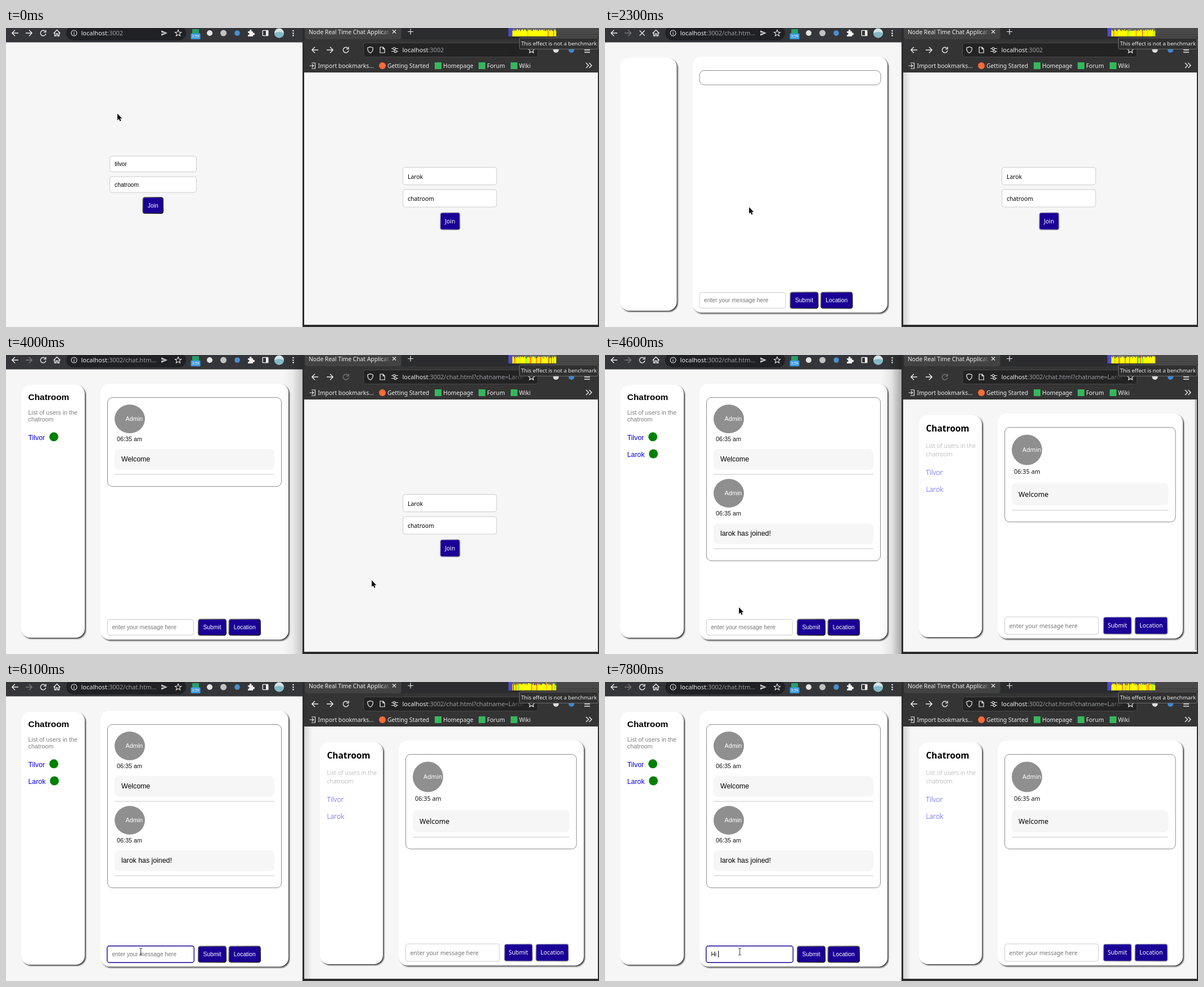
Recreate the animation shown at these times as an HTML page with a canvas. Size 1054x531 px, loop 8000 ms.

```html
<!DOCTYPE html>
<html lang="en">
<head>
<meta charset="utf-8">
<title>Chat demo</title>
<style>
html, body { margin: 0; width: 100%; height: 100%; overflow: hidden; background: #f6f6f6; }
svg, canvas { position: absolute; left: 0; top: 0; display: block; }
canvas { left: 893px; }
text { white-space: pre; }
.arial { font-family: "Liberation Sans", Arial, sans-serif; }
.noto { font-family: "Noto Sans", sans-serif; }
.thin { font-family: "Open Sans", "Noto Sans", sans-serif; font-weight: 300; }
.s10 { font-size: 10.3px; }
.s11 { font-size: 10.8px; }
.s12 { font-size: 12.35px; }
.s15 { font-size: 15.43px; font-weight: 700; }
.url { font-size: 11px; fill: #e8eaed; }
.dim { fill: #9a9da1; }
.hint { fill: #757575; }
.white { fill: #fff; }
.link { fill: #0a00e0; }
.mid { text-anchor: middle; }
.line { fill: none; stroke: #ececec; stroke-width: 1.4; }
.off { stroke: #77797c; }
.panel { fill: #fff; filter: drop-shadow(2.5px 2.5px .8px #444); }
#pointer { animation: move 8s step-end infinite; }
#shade { animation: shade 8s step-end infinite; }
@keyframes shade {
  0% { opacity: 0 } 47.5% { opacity: .3 } 50% { opacity: .65 }
  52.5% { opacity: 1 } 68.75% { opacity: 0 }
}
@keyframes move {
  0% { transform: translate(198px, 152px) }
  5% { transform: translate(204px, 174px) }
  7.5% { transform: translate(214px, 205px) }
  8.75% { transform: translate(226px, 240px) }
  10% { transform: translate(238px, 275px) }
  11.25% { transform: translate(246px, 300px) }
  12.5% { transform: translate(250px, 317px) }
  13.75% { transform: translate(252px, 322px) }
  20% { transform: translate(256px, 318px) }
  37.5% { transform: translate(790px, 308px) }
  40% { transform: translate(802px, 322px) }
  41.25% { transform: translate(800px, 333px) }
  42.5% { transform: translate(799px, 335px) }
  45% { transform: translate(799px, 342px) }
  47.5% { transform: translate(770px, 362px) }
  50% { transform: translate(650px, 400px) }
  52.5% { transform: translate(500px, 430px) }
  55% { transform: translate(300px, 452px) }
  57.5% { transform: translate(238px, 448px) }
  61.25% { transform: translate(239.5px, 468px) }
  63.75% { transform: translate(239.5px, 472px) }
}
</style>
</head>
<body>
<svg id="stage" width="1054" height="531" viewBox="0 0 1054 531"></svg>
<canvas id="load" width="85" height="15"></canvas>
<script>
const LOOP = 8000;
const userA = 'Tilvor', userB = 'Larok';
let css = '', count = 0;

const rect = (x, y, w, h, r, attrs) =>
  `<rect x="${x}" y="${y}" width="${w}" height="${h}" rx="${r}" ${attrs}/>`;
const text = (x, y, cls, s) => `<text x="${x}" y="${y}" class="${cls}">${s}</text>`;
const path = (d, attrs = 'class="line"') => `<path d="${d}" ${attrs}/>`;
const dot = (x, y, r, fill) => `<circle cx="${x}" cy="${y}" r="${r}" fill="${fill}"/>`;
const at = (x, y, ...kids) => `<g transform="translate(${x} ${y})">${kids.join('')}</g>`;

// Shows the content only during the given spans of milliseconds.
function on(spans, ...kids) {
  const name = 'on' + count++;
  const marks = spans.map(([a, b]) => `${a / LOOP * 100}%{opacity:1}` +
    (b < LOOP ? `${b / LOOP * 100}%{opacity:0}` : ''));
  css += `@keyframes ${name}{0%{opacity:${spans[0][0] ? 0 : 1}}${marks.join('')}}`;
  return `<g style="animation:${name} 8s step-end infinite">${kids.join('')}</g>`;
}
const from = (t, ...kids) => on([[t, LOOP]], ...kids);
const until = (t, ...kids) => on([[0, t]], ...kids);

const back = 'M6 0H-5M0-5.2L-5.2 0 0 5.2', ahead = 'M-6 0H5M0-5.2L5.2 0 0 5.2';
const reload = 'M3.6-3.2A4.8 4.8 0 1 0 4.8 1M4.9-5.5V-1.6H1';
const star = 'M0-5.7L1.7-1.8 5.6-1.5 2.6 1.1 3.5 5 0 2.9-3.5 5-2.6 1.1-5.6-1.5-1.7-1.8z';

const input = (x, y, w, h) => rect(x + .5, y + .5, w, h, 4, 'fill="#fff" stroke="#ccc"');
const button = (x, y, w, h, fill, edge, font, label) =>
  rect(x + .75, y + .75, w - 1.5, h - 1.5, 3.5, `fill="${fill}" stroke="url(#${edge})" stroke-width="1.5"`) +
  text(x + w / 2, y + h / 2 + 3.7, `${font} s10 white mid`, label);

const NAVY = '#1a0096';

const defs = `<defs>
  <linearGradient id="dark" x2="1" y2="1"><stop stop-color="#777"/><stop offset=".5" stop-color="#444"/><stop offset="1" stop-color="#0c0c14"/></linearGradient>
  <linearGradient id="pale" x2="1" y2="1"><stop stop-color="#d4d4dc"/><stop offset="1" stop-color="#85858f"/></linearGradient>
  <linearGradient id="toTab"><stop stop-color="#424242" stop-opacity="0"/><stop offset=".5" stop-color="#424242"/></linearGradient>
  <linearGradient id="toField"><stop stop-color="#232323" stop-opacity="0"/><stop offset="1" stop-color="#232323"/></linearGradient>
  <linearGradient id="shadeL"><stop stop-opacity="0"/><stop offset=".5" stop-opacity=".07"/><stop offset="1" stop-opacity=".32"/></linearGradient>
  <linearGradient id="shadeR"><stop stop-opacity=".14"/><stop offset="1" stop-opacity="0"/></linearGradient>
</defs>`;

function leftBar() {
  const host = 'localhost<tspan class="dim">:3002';
  return rect(0, 0, 527, 25.5, 0, 'fill="#353639"') +
    rect(107, -4, 213, 26, 13, 'fill="#202124"') +
    at(16, 9, path(back)) +
    at(41, 9, until(1600, path(ahead)), from(1600, path(ahead, 'class="line off"'))) +
    at(66, 9, on([[0, 1400], [2500, LOOP]], path(reload)),
      on([[1400, 2500]], path('M-4.5-4.5L4.5 4.5M4.5-4.5L-4.5 4.5'))) +
    at(90.5, 9, path('M-6 .5L0-5.5 6 .5M-4-1V5H-1.3V1.2H1.3V5H4V-1')) +
    at(121, 9, path('M0-5A5 5 0 1 1-.01-5zM0-.6V3M0-2.8V-1.5', 'class="line" style="stroke-width:1.1"')) +
    until(1600, text(133.5, 13, 'noto url', host + '</tspan>')) +
    from(1600, text(133.5, 13, 'noto url', host + '/chat.htm…</tspan>')) +
    at(281, 9, path('M-5-4.8L6 0-5 4.8V1.2L1.5 0-5-1.2z', 'fill="#c4c6c8"')) +
    at(306, 9, path(star, 'class="line" style="stroke-width:1.1"')) +
    rect(331, 2, 12, 8, 1, 'fill="#25a068"') +
    rect(328.5, 9.5, 17, 10.5, 1.5, 'fill="#3d9be0"') +
    text(337, 17.3, 'noto white mid" font-size="6.8', '3:59') +
    dot(362, 9, 5, '#e4e4e4') + dot(386.5, 9, 5.5, '#c2c2c2') + dot(411, 9, 4.8, '#4a90d0') +
    at(435, 9, path('M-5-3H-2A2 2 0 1 1 1.3-3H4V0A2 2 0 1 1 4 3.3V6H-5V3A1.8 1.8 0 1 0-5-.3z', 'fill="#f2f2f2"')) +
    at(461, 9, rect(-4.8, -4.6, 9.6, 9.2, .5, 'class="line"'), rect(1, -4.6, 4, 9.2, 0, 'fill="#f2f2f2"')) +
    dot(485.5, 9, 8.5, '#d3e4e6') + path('M477 9Q485 5 494 9A8.5 8.5 0 0 1 477 9z', 'fill="#83b9c6"') +
    [5, 9.2, 13.4].map(y => dot(510.5, y, 1.3, '#eee')).join('');
}

function leftLogin() {
  const join = fill => button(242.5, 300, 37.5, 30, fill, 'dark', 'arial', 'Join');
  return input(184, 227, 154, 28) + input(184, 263.5, 154, 28) +
    text(193, 245.3, 'arial s10', userA.toLowerCase()) + text(193, 281.8, 'arial s10', 'chatroom') +
    join(NAVY) + on([[1000, 1600]], join('#00f'));
}

function leftFrame(dx) {
  return rect(27, 53, 113 + dx, 449, 16, 'class="panel"') +
    rect(168 + dx, 51, 334 - dx, 454.5, 16, 'class="panel"') +
    at(dx, 0, input(180, 469, 153, 28),
      button(341, 468.5, 51, 30, NAVY, 'dark', 'arial', 'Submit'),
      button(395.5, 468.5, 57.5, 30, NAVY, 'dark', 'arial', 'Location'));
}

const board = (x, y, w, h) => rect(x + .5, y + .5, w, h, 8.5, 'fill="#fff" stroke="#8c8c8c"');
const leftHint = x => text(x, 487, 'arial s10 hint', 'enter your message here');

const leftNote = (y, s) => at(193, y,
  '<ellipse cx="27" cy="25.5" rx="27" ry="25.5" fill="#8f8f8f"/>',
  text(19.5, 29.3, 'arial s11 white', 'Admin'), text(4, 65, 'arial s11" fill="#111', '06:35 am'),
  rect(0, 79, 284, 37, 8, 'fill="#f6f6f6"'), text(12, 101.3, 'arial s12', s),
  rect(0, 123.5, 284, 1, 0, 'fill="#c8c8c8"'));

const caret = (x, ...spans) => on(spans, rect(x, 477.5, 1, 11.5, 0, ''));

function leftChat() {
  return leftFrame(0) +
    until(4400, board(180, 75, 309, 158)) +
    from(4400, board(180, 75, 309, 290), leftNote(220, userB.toLowerCase() + ' has joined!'),
      text(39.5, 180.7, 'arial s12 link', userB), dot(86, 175.5, 8, '#008000')) +
    leftNote(88, 'Welcome') +
    text(39.5, 79.5, 'arial s15', 'Chatroom') +
    text(39.5, 105.7, 'arial s11" fill="#808080', 'List of users in the') +
    text(39.5, 118, 'arial s11" fill="#808080', 'chatroom') +
    text(39.5, 150.5, 'arial s12 link', userA) + dot(85, 145.3, 8, '#008000') +
    from(5500, rect(179.75, 468.75, 154.5, 29.5, 4, `fill="#fff" stroke="${NAVY}" stroke-width="1.4"`)) +
    until(7000, leftHint(188.4)) +
    from(7000, text(188.4, 487, 'arial s10', 'H')) + from(7300, text(195.8, 487, 'arial s10', 'i')) +
    caret(188, [5500, 6000], [6500, 7000]) + caret(195.6, [7000, 7300]) +
    caret(198, [7300, 7700]) + caret(201, [7700, LOOP]);
}

function rightBar() {
  const host = 'localhost<tspan class="dim">:3002';
  const mark = (x, label) => rect(x, 61, 12, 12, 0, 'fill="#35b85c"') + text(x + 15, 70.5, 'noto s10" fill="#eee', label);
  return rect(527, 0, 527, 531, 0, 'fill="#2b2c2d"') +
    rect(530, 20, 524, 59, 0, 'fill="#343434"') +
    rect(531, -6, 171.5, 26, 4, 'fill="#424242"') +
    text(538, 10.5, 'noto s10" fill="#eee', 'Node Real Time Chat Application') +
    rect(667, 0, 32, 18, 0, 'fill="url(#toTab)"') +
    at(690, 6.5, path('M-3-3L3 3M3-3L-3 3', 'class="line" style="stroke-width:1.1"')) +
    at(719, 6.5, path('M-5 0H5M0-5V5', 'class="line" style="stroke-width:1.2"')) +
    rect(635.5, 26.5, 310, 25, 4, 'fill="#232323" stroke="#484848"') +
    at(549, 39, path(back)) + at(576, 39, path(ahead)) +
    at(604, 39, on([[0, 3800], [5100, LOOP]], path(reload)), on([[3800, 5100]], path(reload, 'class="line off"'))) +
    at(647.5, 39, path('M0-5.5L4.8-3.8Q5 3 0 5.5-5 3-4.8-3.8z', 'class="line" style="stroke-width:1.2"')) +
    at(669, 39, path('M-4-5H1.2L4-2V5H-4zM1-5V-1.8H4', 'class="line" style="stroke-width:1.2"')) +
    at(691, 39, path('M-6-2.5H-3M1-2.5H6M-6 2.5H-1M3 2.5H6M-3-2.5A2 2 0 1 1 1-2.5 2 2 0 1 1-3-2.5M-1 2.5A2 2 0 1 1 3 2.5 2 2 0 1 1-1 2.5',
      'class="line" style="stroke-width:1.1"')) +
    `<g style="font-size:10.9px">` +
    until(4000, text(704.5, 42.7, 'noto" fill="#eee', host + '</tspan>')) +
    from(4000, text(704.5, 42.7, 'noto" fill="#eee', `${host}/chat.html?chatname=${userB}</tspan>`)) + '</g>' +
    rect(896, 28, 26, 22, 0, 'fill="url(#toField)"') +
    at(934, 39, path(star, 'class="line" style="stroke-width:1.2"')) +
    dot(977.5, 39, 5, '#dedede') + dot(1005, 39, 5, '#3d8ad0') +
    path('M1028 35H1038M1028 39H1038M1028 43H1038') +
    at(545, 67, path('M-2-5H4.5V5H-2M-5.5 0H1.5M-1-2.7L1.7 0-1 2.7', 'class="line" style="stroke-width:1.2"')) +
    text(554.5, 70.5, 'noto s10" fill="#eee', 'Import bookmarks...') +
    dot(669, 67, 6, '#ff6b35') + text(678, 70.5, 'noto s10" fill="#eee', 'Getting Started') +
    mark(762, 'Homepage') + mark(840, 'Forum') + mark(897, 'Wiki') +
    path('M1031 62L1035.5 66.5 1031 71M1036.5 62L1041 66.5 1036.5 71') +
    rect(530, 79, 522, 448, 0, 'fill="#f6f6f6"') +
    rect(978, 0, 76, 16, 0, 'fill="#494949"') + rect(978, 11, 76, 1, 0, 'fill="#393939"') +
    rect(912.5, 17.5, 140, 20, 2, 'fill="#303030" fill-opacity=".94" stroke="#6c6c6c"') +
    text(915.5, 30.5, 'noto" font-size="9.55" fill="#f0f0f0', 'This effect is not a benchmark');
}

function rightLogin() {
  const join = fill => button(771, 327, 36.5, 32, fill, 'pale', 'noto', 'Join');
  return input(705, 247, 166.5, 31) + input(705, 286.5, 166.5, 31) +
    text(714, 267.5, 'noto s10', userB) + text(714, 307, 'noto s10', 'chatroom') +
    join(NAVY) + on([[3300, 3800]], join('#00f'));
}

function rightFrame(dx) {
  return rect(558, 107, 112 + dx, 394, 16, 'class="panel"') +
    rect(698 + dx, 104, 329 - dx, 399.5, 16, 'class="panel"') +
    at(dx, 0, input(710, 464.5, 166.5, 31), text(718.5, 485, 'noto s10 hint', 'enter your message here'),
      button(885, 464.5, 51.5, 32, NAVY, 'pale', 'noto', 'Submit'),
      button(941, 464.5, 59.5, 32, NAVY, 'pale', 'noto', 'Location'));
}

function rightChat() {
  const grey = 'thin s11" fill="#9c9c9c', blue = 'thin s12" fill="#3c3cec';
  return rightFrame(0) + board(710, 128, 303.5, 168) +
    text(570.5, 136, 'noto s15', 'Chatroom') +
    text(570.5, 164.5, grey, 'List of users in the') + text(570.5, 180, grey, 'chatroom') +
    text(570.5, 213.3, blue, userA) + text(570.5, 243.3, blue, userB) +
    dot(750, 168.5, 27, '#8f8f8f') + text(742, 172.3, 'noto s11 white', 'Admin') +
    text(727, 211, 'noto s11" fill="#111', '06:35 am') +
    rect(723, 227, 278.5, 40, 8, 'fill="#f6f6f6"') + text(735, 251.6, 'noto s12', 'Welcome') +
    rect(723, 275, 278.5, 1, 0, 'fill="#c8c8c8"');
}

const ink = 'stroke-linejoin="round" stroke-width="1"';
const pointer = `<g id="pointer">` +
  on([[0, 1000], [1600, 3300], [3800, 4900]],
    path('M0 0V11.8L2.7 9.4 4.6 13.6 6.6 12.7 4.8 8.7H8.4z', `fill="#111" stroke="#fff" ${ink} paint-order="stroke"`)) +
  on([[1000, 1600], [3300, 3800]],
    path('M0 1.2Q1-.6 2 1.2V5Q3.6 4 4.2 5.4 5.6 4.6 6.2 6 7.6 5.4 8 7V10L7 13H1.8L-2.6 8Q-2.2 6.4 0 8z', `fill="#fff" stroke="#111" ${ink}`)) +
  from(4900, path('M-2.5 .5Q0 .5 0 2V11.5Q0 13 2.5 13M2.5 .5Q0 .5 0 2M0 11.5Q0 13-2.5 13', 'fill="none" stroke="#222"')) +
  '</g>';

document.getElementById('stage').innerHTML = defs +
  rect(0, 0, 527, 531, 0, 'fill="#f6f6f6"') + leftBar() +
  until(1600, leftLogin()) +
  on([[1600, 2500]], leftFrame(-12.5), board(167.5, 75, 322, 25.5), leftHint(176)) +
  from(2500, leftChat()) +
  rightBar() + until(4400, rightLogin()) +
  on([[4400, 4600]], rightFrame(-12.5), board(697.5, 128, 316, 26)) +
  from(4600, rightChat()) +
  on([[4400, 5300]], rect(1048.5, 79, 3, 445, 0, 'fill="#b4b4b4"')) +
  on([[1300, 3800], [5500, LOOP]], rect(530, 79, 14, 448, 0, 'fill="url(#shadeR)"')) +
  `<g id="shade">${rect(491, 0, 36, 531, 0, 'fill="url(#shadeL)"')}</g>` + pointer;

const sheet = document.createElement('style');
sheet.textContent = css;
document.head.append(sheet);

// Scrolling load graph: more coloured spikes as time goes on.
const ctx = document.getElementById('load').getContext('2d');
const noise = n => { const v = Math.sin(n * 12.9898) * 43758.5453; return v - Math.floor(v); };
function bar(x, h, color) {
  ctx.fillStyle = color;
  ctx.fillRect(x, 15 - h, 1, h);
}
function draw() {
  const tick = Math.floor(performance.now() % LOOP / 100);
  ctx.fillStyle = '#66656c';
  ctx.fillRect(0, 0, 85, 15);
  ctx.fillStyle = '#5148d0';
  ctx.fillRect(0, 0, 7, 15);
  for (let x = 0; x < 78; x++) {
    const n = x + tick * 3, spike = noise(n) < n / 1300;
    const color = spike ? ['#f22', '#2e2', '#fa2'][Math.floor(noise(n + 500) * 3)] : '#ff0';
    bar(x + 7, spike ? 9 + 6 * noise(n + 900) : 9 + 4 * noise(n + 900), color);
  }
  requestAnimationFrame(draw);
}
requestAnimationFrame(draw);
</script>
</body>
</html>
```
